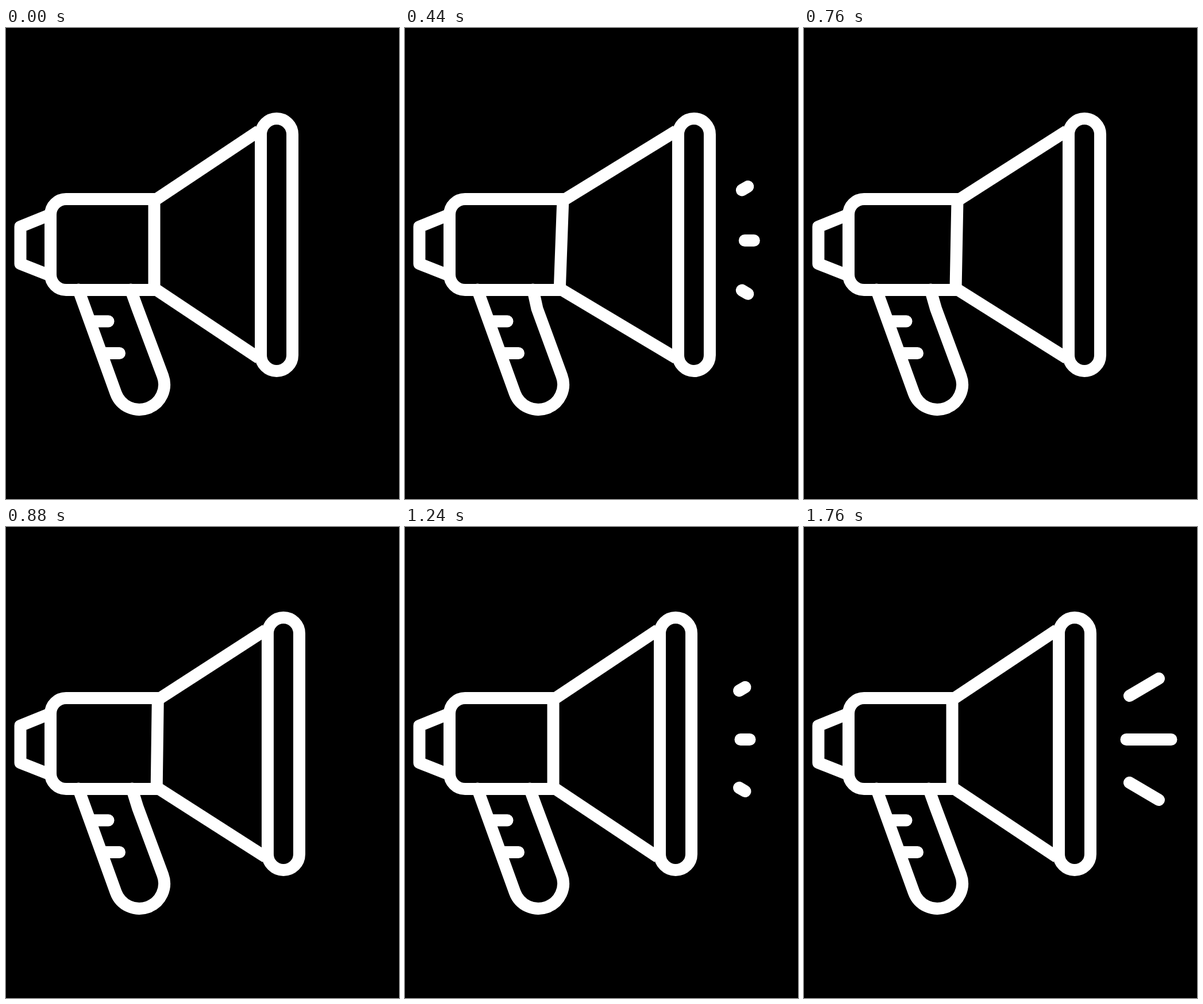
Recreate the animation shown at these times as an HTML page. Size 684 by 819 pixels, loop 1.96 s.

```html
<!DOCTYPE html>
<html lang="en">
<head>
<meta charset="utf-8">
<title>Megaphone</title>
<style>
  html, body { margin: 0; height: 100%; overflow: hidden; background: #000; }
  svg { display: block; width: 100vw; height: 100vh; }
  path, rect { fill: none; stroke: #fff; stroke-width: 21; }
  .round { stroke-linecap: round; stroke-linejoin: round; }
</style>
</head>
<body>
<svg viewBox="0 0 684 819">
  <path class="round" d="M72 326.5L25 345.5V410L72 428.5"/>
  <path class="round" d="M150 510H178M170 565.5H197.5"/>
  <path id="handle" class="round"/>
  <path id="body"/>
  <path id="cone"/>
  <rect id="rim" y="157.5" width="55" height="439" rx="27.5"/>
  <path id="rays" class="round"/>
</svg>
<script>
const LOOP = 1960, STEP = 40;

// Keys are [time, value] pairs
const push = [[200, 0], [370, 42], [600, -5.5], [800, 19.4], [1010, -4.2], [1220, 0]];
const rayEnd = [[225, 0], [609, 1], [1080, 1], [1400, 0], [1440, 0], [1760, 1]];
const rayStart = [[210, 0], [747, 1], [1080, 1], [1332, 0]];

const rays = [
  [566.5, 293.5, 617.5, 263.5],
  [561, 369.5, 639, 369.5],
  [566.5, 444.5, 617.5, 474.5]
];

const mix = (a, b, p) => a + (b - a) * p;
const ease = p => (1 - Math.cos(Math.PI * p)) / 2;

function valueAt(keys, t) {
  const next = keys.findIndex(key => key[0] > t);
  if (next === 0) return keys[0][1];
  if (next < 0) return keys[keys.length - 1][1];
  const [t0, a] = keys[next - 1], [t1, b] = keys[next];
  return mix(a, b, ease((t - t0) / (t1 - t0)));
}

const setPath = (id, d) => document.getElementById(id).setAttribute("d", d);

function draw(t) {
  // The horn slides while the body and handle stretch after it
  const dx = valueAt(push, t);
  const top = dx * 0.53, bottom = dx * 0.35;
  setPath("body", `M${258 + top} 297.5H104.5a27 27 0 0 0 -27 27V428.5a27 27 0 0 0 27 27H${258 + bottom}Z`);
  setPath("cone", `M${261 + top} 298.3L${440 + dx} 179M${261 + bottom} 454.7L${440 + dx} 574`);
  setPath("handle", `M126 455L191.2 635.1A43.5 43.5 0 0 0 272.8 604.9L${229 + dx * 0.03} 488L${217 + dx * 0.18} 455`);
  document.getElementById("rim").setAttribute("x", 443.5 + dx);

  const from = valueAt(rayStart, t), to = valueAt(rayEnd, t);
  setPath("rays", to <= from ? "" : rays.map(([x0, y0, x1, y1]) =>
    `M${mix(x0, x1, from)} ${mix(y0, y1, from)}L${mix(x0, x1, to)} ${mix(y0, y1, to)}`).join(""));
}

const begin = performance.now();
function tick() {
  const t = (performance.now() - begin) % LOOP;
  draw(Math.floor(t / STEP) * STEP);
  requestAnimationFrame(tick);
}
tick();
</script>
</body>
</html>
```
